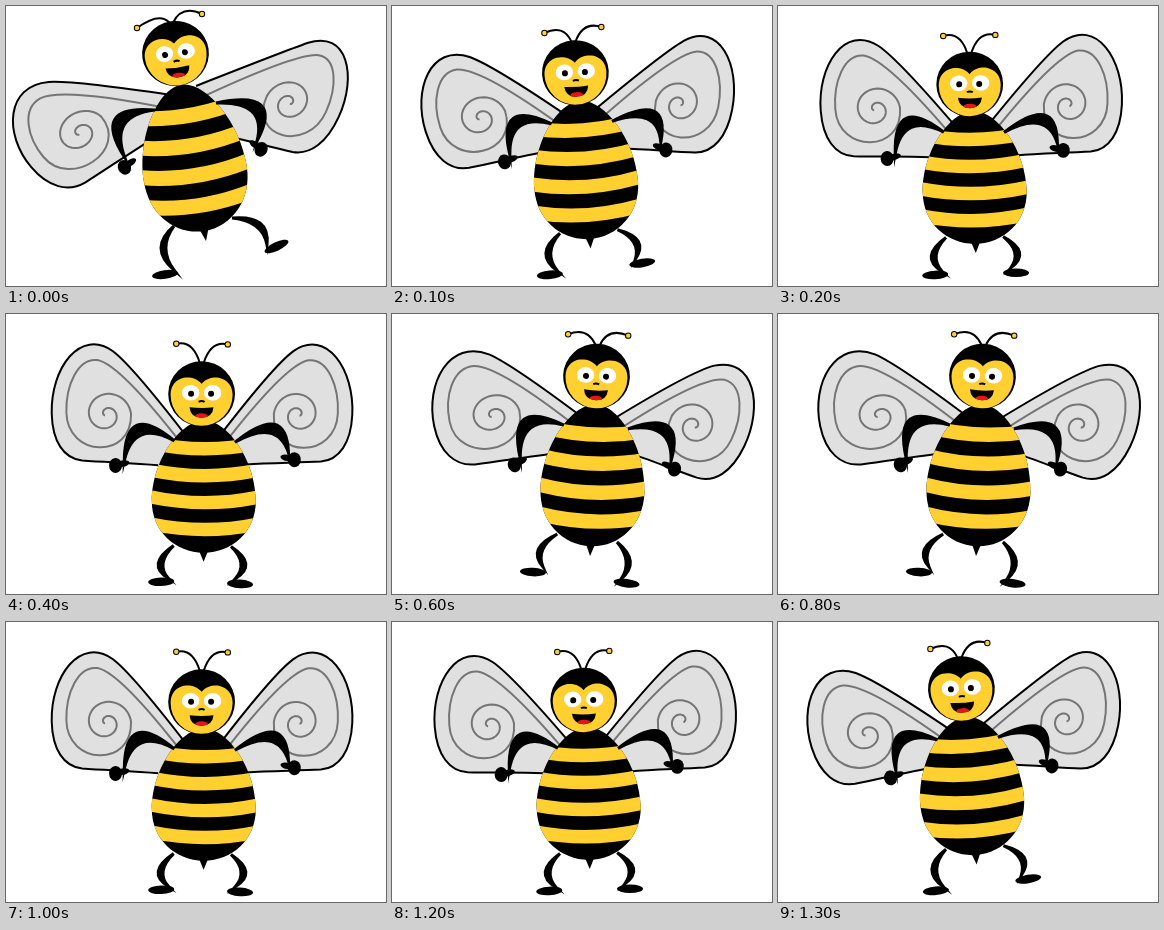
Animation, 380 px wide and 280 px high, one loop 1400 ms. Source, as an HTML page with a canvas:

```html
<!DOCTYPE html>
<html lang="en">
<head>
<meta charset="utf-8">
<title>Dancing bee</title>
<style>
html, body { margin: 0; width: 100%; height: 100%; overflow: hidden; background: #fff; }
canvas { display: block; }
</style>
</head>
<body>
<canvas id="stage" width="380" height="280"></canvas>
<script>
const ctx = document.getElementById('stage').getContext('2d');
const YELLOW = '#ffd030', TAU = Math.PI * 2, DEG = Math.PI / 180;
let left = 0, right = 0; // how far the bee leans each way

// Blend the upright pose with the left and right leaning poses.
const mix = (mid, l, r) => mid.map((v, i) => v + left * (l[i] - v) + right * (r[i] - v));

function fill(color, path) {
  ctx.fillStyle = color;
  path ? ctx.fill(path) : ctx.fill();
}
function stroke(color, width, path) {
  ctx.strokeStyle = color;
  ctx.lineWidth = width;
  path ? ctx.stroke(path) : ctx.stroke();
}
function oval(x, y, rx, ry, color, turn = 0) {
  ctx.beginPath();
  ctx.ellipse(x, y, rx, ry, turn * DEG, 0, TAU);
  fill(color);
}
function placed([x, y, turn], draw) {
  ctx.save();
  ctx.translate(x, y);
  ctx.rotate(turn * DEG);
  draw();
  ctx.restore();
}

// The blade is drawn around the eye of its spiral and runs to a root on the body.
// side -1 mirrors it; pose: root x, y, eye x, y, x scale and angle, y scale and angle
function wing(side, ...poses) {
  const [rx, ry, x, y, sx, ax, sy, ay] = mix(...poses);
  const blade = (rootY, trace) => {
    ctx.beginPath();
    ctx.moveTo(rx, rootY);
    ctx.save();
    ctx.transform(sx * Math.cos(ax * DEG), sx * Math.sin(ax * DEG),
      -sy * Math.sin(ay * DEG), sy * Math.cos(ay * DEG), x, y);
    ctx.scale(side, 1);
    trace();
    ctx.restore();
  };
  blade(ry, () => {
    ctx.quadraticCurveTo(26, -49, 8, -63.5);
    ctx.bezierCurveTo(-24, -88, -54, -48, -54, -2.5);
    ctx.bezierCurveTo(-54, 26, -43, 43, -25, 45.5);
    ctx.bezierCurveTo(0, 48, 25, 49, 50, 52);
  });
  fill('#e0e0e0');
  stroke('#000', 2);
  blade(ry + 14, () => {
    ctx.quadraticCurveTo(15, -50, -7.5, -55);
    ctx.bezierCurveTo(-27, -58, -39.5, -30, -39.5, -3);
    ctx.bezierCurveTo(-39.5, 42, 24.4, 46, 24.4, 0);
    for (let t = 0.25; t < 1.85; t += 0.02) {
      const r = 28 - 14.5 * t;
      ctx.lineTo(r * Math.sin(t * TAU), r * Math.cos(t * TAU));
    }
  });
  stroke('#757575', 2);
}

// A crescent from joint to tip, bending through a middle point.
function limb(...poses) {
  const [x, y, mx, my, ex, ey] = mix(...poses);
  const cx = (x + ex) / 2, cy = (y + ey) / 2;
  const bend = k => [cx + k * (mx - cx), cy + k * (my - cy)];
  ctx.beginPath();
  ctx.moveTo(x, y);
  ctx.quadraticCurveTo(...bend(2), ex, ey);
  ctx.quadraticCurveTo(...bend(1.25), x, y);
  fill('#000');
  stroke('#000', 3);
}

function foot(...poses) {
  placed(mix(...poses), () => oval(0, 0, 13, 4.3, '#000'));
}

function hand(side, ...poses) {
  placed(mix(...poses), () => {
    oval(-2 * side, 0.5, 6.5, 7.5, '#000');
    oval(5 * side, -1, 7, 3.2, '#000', -10 * side);
  });
}

const egg = new Path2D('M0-140C24-140 52-100 52-60C52-30 28-9 0-9C-28-9-52-30-52-60C-52-100-24-140 0-140Z');
const sting = new Path2D('M-5-12H5L0 0Z');

function body() {
  const [x, y, turn, tall] = mix([197.5, 248.5, 0, 1], [200, 235, -9, 1.13], [198.5, 237, 3.8, 1.15]);
  placed([x, y, turn], () => {
    ctx.scale(1, tall);
    fill('#000', sting);
    fill('#000', egg);
    ctx.clip(egg);
    for (let i = 0; i < 4; i++) {
      const mid = -112 + 26.7 * i;
      ctx.beginPath();
      ctx.moveTo(-56, mid - 6);
      ctx.quadraticCurveTo(0, mid + 6, 56, mid - 6);
      stroke(YELLOW, 13.3);
    }
  });
}

function feeler(side, turn, ...poses) {
  const [x, y] = mix(...poses);
  const base = 2 * side + 31 * Math.sin(turn * DEG);
  ctx.beginPath();
  ctx.moveTo(base, -31);
  ctx.quadraticCurveTo(base + 0.3 * (x - base), y / 2 - 29, x, y);
  stroke('#000', 2);
  oval(x, y, 3.2, 3.2, '#000');
  oval(x, y, 2.2, 2.2, YELLOW);
}

const face = new Path2D('M0-10C-5-16-12-17-18-16C-26-14-31-8-31 1A31 31 0 0 0 31 1C31-8 26-14 18-16C12-17 5-16 0-10Z');
const mouth = new Path2D('M-12 13.5Q0 15 12 13.5Q11 24 0 24Q-11 24-12 13.5Z');
const nose = new Path2D('M-3 8Q0 6.5 3 8');

function head() {
  const [x, y, turn] = mix([194.5, 82, 0], [169.5, 47.5, -8], [212.3, 47, 4]);
  placed([x, y, 0], () => {
    feeler(-1, turn, [-25, -51], [-38.5, -25.5], [-31, -35]);
    feeler(1, turn, [25.5, -50.5], [26.5, -39.5], [36.5, -33]);
  });
  placed([x, y, turn], () => {
    oval(0, 0, 33.4, 32.5, '#000');
    fill(YELLOW, face);
    for (const side of [-1, 1]) {
      oval(11 * side, -1, 8.7, 7.8, '#fff');
      oval(10 * side - 0.5, 0, 3, 3, '#000');
    }
    stroke('#000', 2, nose);
    fill('#000', mouth);
    ctx.clip(mouth);
    oval(0, 22.5, 6.5, 3, '#e8141c');
  });
}

function bee() {
  wing(1, [178, 123, 100.3, 100.5, 1, 0, 1, 0],
    [165, 89, 74, 127, 1.1, -37, 0.94, -40],
    [200, 88, 101.5, 103, 1.185, -21.3, 0.93, -21.3]);
  wing(-1, [215, 121, 291, 99.5, 1, 0, 1, 0],
    [190, 80, 283, 97, 0.95, 18.4, 1, 24.5],
    [224, 94, 310.5, 122, 1, 44.4, 1, 46]);

  limb([168, 233, 153, 251, 164, 266], [168, 220, 155, 242, 168, 264], [163, 210, 141, 223, 141, 243]);
  limb([225, 233, 240, 250, 229, 265], [226, 212, 254, 217, 261, 239], [225, 224, 237, 245, 229, 265]);
  foot([157, 269, -3], [159, 268.5, -8], [128.5, 249.5, 8]);
  foot([234, 270, 3], [270.5, 240.5, -25], [235, 268.5, 10]);

  body();

  limb([168, 129, 131, 112, 117, 147], [149, 104, 109, 113, 119, 152], [175, 97, 133, 100, 137, 143]);
  limb([228, 130, 267, 110, 283, 138], [210, 97, 255, 99, 251, 135], [242, 103, 283, 114, 276, 154]);
  hand(1, [110, 151, 0], [120, 160, -25], [135, 149, -30]);
  hand(-1, [287, 144, 0], [253.5, 142, 25], [276, 162, 30]);

  head();
}

// Twelve-a-side sway in 100 ms steps: ease out to upright, ease in to the other lean, and back.
const start = performance.now();
function draw(now) {
  const step = Math.floor(Math.max(0, now - start) / 100) % 14;
  const k = Math.min(step, 14 - step);
  left = Math.max(0, (3 - k) / 3) ** 2;
  right = Math.max(0, (k - 3) / 4) ** 2;
  ctx.clearRect(0, 0, 380, 280);
  bee();
  requestAnimationFrame(draw);
}
draw(start);
</script>
</body>
</html>
```
